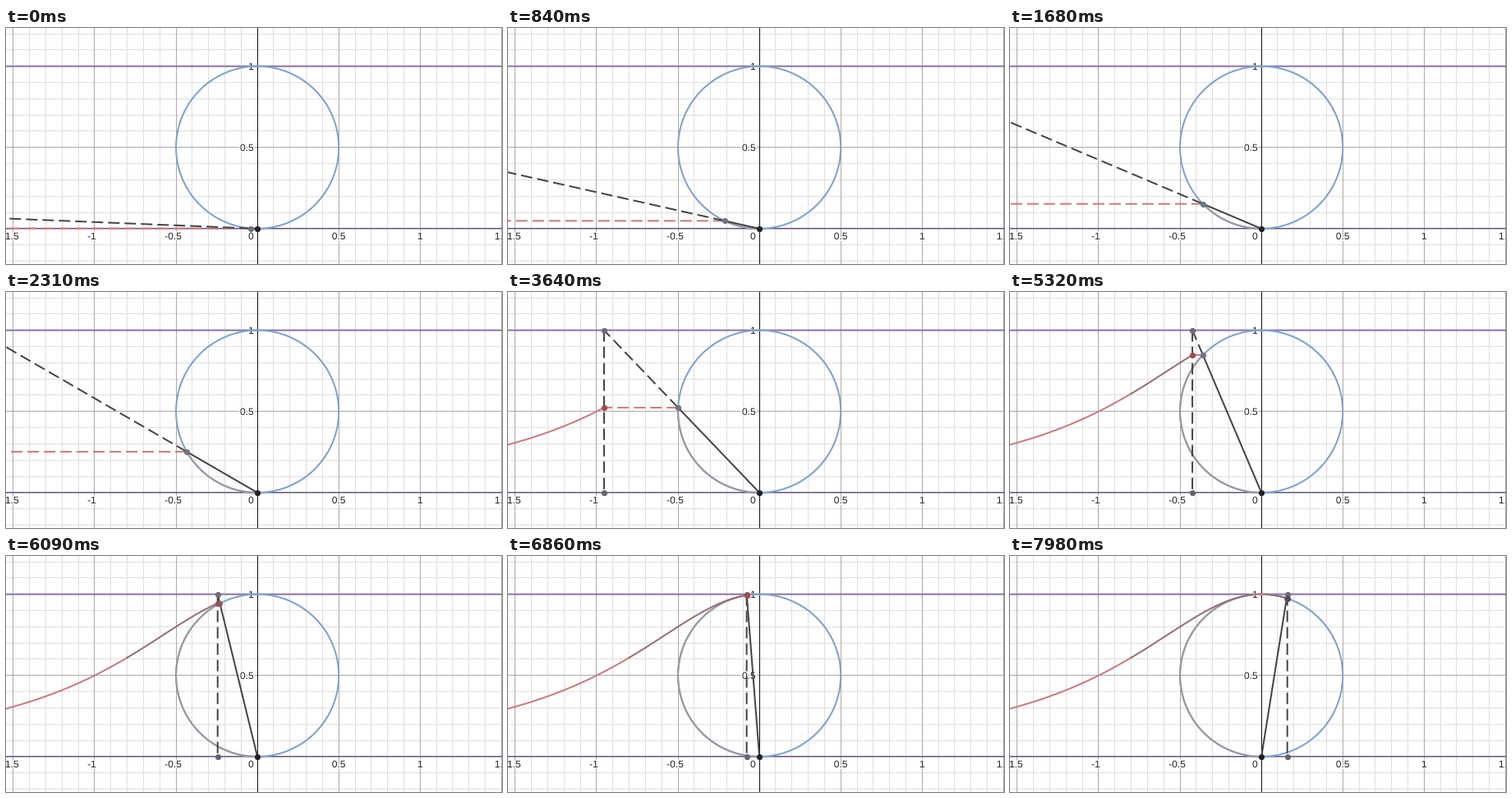
Animation, 604 px wide and 288 px high, one loop 8000 ms. Source, as a matplotlib script:

```python
import numpy as np
import matplotlib.pyplot as plt
import matplotlib.patheffects as pe
from matplotlib.animation import FuncAnimation

W, H, DPI = 604, 288, 100
PX = 72 / DPI                      # points per pixel
OX, OY, UNIT = 306.15, 244.86, 198.2
LOOP, TICK, STEP = 8000, 20, 70    # ms

RED, BROWN, DARK = "#c67b7d", "#946f72", "#444444"
BLUE, GREY, PURPLE = "#80a0cb", "#98999e", "#8a74a6"

# angle of the secant line at a few steps, nearly linear
KEY_STEPS = [0, 24, 33, 52, 76, 98, 114]
KEY_ANGLES = [0.0405, 0.4012, 0.526, 0.8087, 1.1696, 1.4927, 1.7286]

# colour bands along the witch curve: start, end, colour
BANDS = [(-1.7, -0.8, RED), (-0.8, -0.05, BROWN),
         (-0.05, 0.03, RED), (0.03, 0.3, BROWN)]

plt.rcParams["font.family"] = "Liberation Sans"
plt.rcParams["path.snap"] = False
fig = plt.figure(figsize=(W / DPI, H / DPI), dpi=DPI, facecolor="white")
ax = fig.add_axes([0, 0, 1, 1])
ax.set_xlim(0, W)
ax.set_ylim(H, 0)
ax.axis("off")


def to_px(x, y):
    return OX + UNIT * np.asarray(x), OY - UNIT * np.asarray(y)


def line(color, width, z, x=(), y=(), **kw):
    px, py = to_px(x, y)
    return ax.plot(px, py, color=color, lw=width * PX, zorder=z, **kw)[0]


def dashed(color, z):
    return line(color, 2, z, linestyle=(0, (7, 3)))


def dot(color, z, radius=3.6):
    return ax.plot([], [], "o", color=color, ms=2 * radius * PX, mew=0, zorder=z)[0]


def put(artist, x, y):
    artist.set_data(*to_px(x, y))


def rules(values, color, z):
    """Crisp one-pixel lines across the stage, both ways."""
    for v in values:
        px, py = np.floor(to_px(v, v)) + 0.5
        ax.plot([px, px], [0, H], color=color, lw=PX, zorder=z)
        ax.plot([0, W], [py, py], color=color, lw=PX, zorder=z)


def label(x, y, s):
    ax.text(x, y, s, size=12 * PX, color="#222222", ha="center",
            va="center_baseline", zorder=4,
            path_effects=[pe.withStroke(linewidth=3 * PX, foreground="white")])


def circle(a):
    """Point of the circle on the ray at angle a."""
    return -np.sin(a) * np.cos(a), np.sin(a) ** 2


rules(np.arange(-16, 17) / 10, "#dedede", 1)
rules(np.arange(-3, 4) / 2, "#a9a9a9", 2)
rules([0], "#111111", 3)

for i in (-3, -2, -1, 1, 2, 3):
    x = OX + UNIT * i / 2
    label(x - (3.5 if i < 0 else 0), 253.5, f"{i / 2:g}")
label(298.4, 253.5, "0")
label(293.4, 145.5, "0.5")
label(298.4, 46.5, "1")

for y, alpha in ((1, 1), (0, 0.65)):
    line(PURPLE, 2, 5, [-2, 2], [y, y], alpha=alpha)
line(BLUE, 2, 6, *circle(np.linspace(0, np.pi, 200)))

arc = line(GREY, 2, 7)
bands = [line(c, 2, 8) for _, _, c in BANDS]
level = dashed(RED, 9)
drop = dashed(DARK, 10)
ray = dashed(DARK, 10)
chord = line(DARK, 2, 10)
foot_dot = dot("#66666e", 11)
top_dot = dot("#6e6a78", 11)
circle_dot = dot("#70757e", 11)
curve_dot = dot("#a04c4c", 12)
origin_dot = dot("#222226", 13)
put(origin_dot, [0], [0])


def draw(i):
    step = (i * TICK + TICK // 2) // STEP
    a = np.interp(step, KEY_STEPS, KEY_ANGLES)
    cx, cy = circle(a)
    tx = -1 / np.tan(a)

    put(arc, *circle(np.linspace(0, a, 120)))
    for band, (lo, hi, _) in zip(bands, BANDS):
        x = np.linspace(lo, min(hi, tx), 60) if tx > lo else np.array([])
        put(band, x, 1 / (1 + x ** 2))

    put(level, [cx, tx], [cy, cy])
    put(drop, [tx, tx], [1, 0])
    put(ray, [cx, tx], [cy, 1])
    put(chord, [0, cx], [0, cy])
    put(foot_dot, [tx], [0])
    put(top_dot, [tx], [1])
    put(circle_dot, [cx], [cy])
    put(curve_dot, [tx], [cy])
    curve_dot.set_color("#5c4a4c" if tx > 0 else "#a04c4c")
    return []


anim = FuncAnimation(fig, draw, frames=LOOP // TICK, interval=TICK,
                     repeat=True, repeat_delay=0, blit=False)
plt.show()
```
